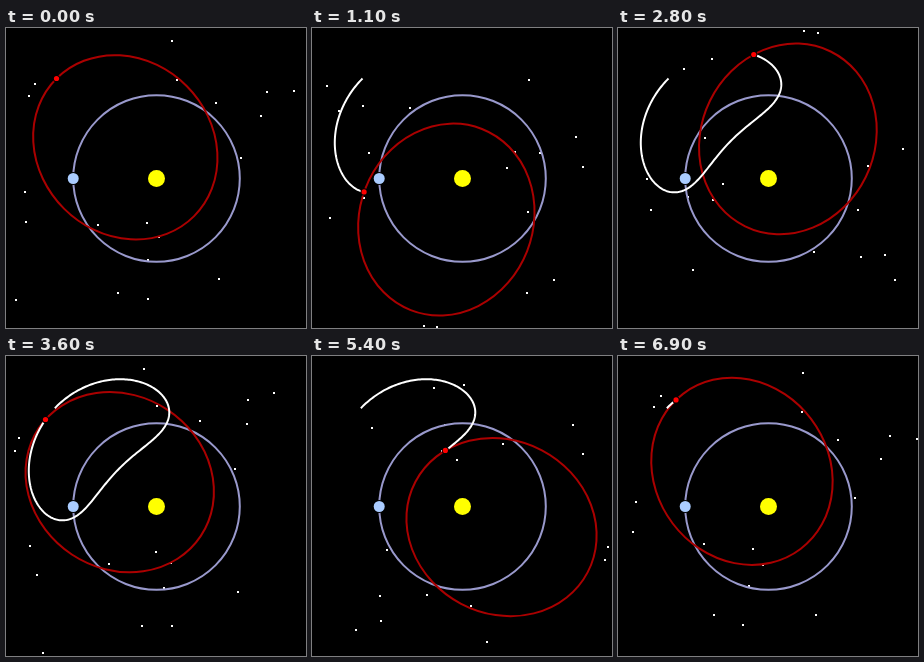
Recreate the animation shown at these times as an HTML page with a canvas. Size 300x300 px, loop 7000 ms.

```html
<!DOCTYPE html>
<html lang="en">
<head>
<meta charset="utf-8">
<title>Co-orbital asteroid in a rotating frame</title>
<style>
html, body { margin: 0; height: 100%; overflow: hidden; background: #000; }
canvas { display: block; }
</style>
</head>
<body>
<canvas id="stage" width="300" height="300"></canvas>
<script>
const ctx = document.getElementById('stage').getContext('2d');
const STEP_MS = 100, STEPS = 70, YEAR = 35;
const RAD = Math.PI / 180;
const FRAME_SPIN = 10.319 * RAD;   // turn of the view per step
const MEAN_MOTION = 10.3 * RAD;    // asteroid's mean anomaly per step
const RING = 83.3;
const A = 97.3, C = 44.1, B = Math.sqrt(A * A - C * C), ECC = C / A;

// Star positions relative to the sun
const STARS = [
  [16, -137], [-121, -94], [-127, -82], [21, -98], [60, -75], [111, -86],
  [138, -87], [105, -62], [85, -20], [-131, 14], [-130, 44], [-58, 47],
  [-9, 45], [3, 59], [-8, 82], [-38, 115], [-8, 121], [63, 101], [-140, 122]
];

const axisAngle = n => -135 * RAD - FRAME_SPIN * n;

function rotate(x, y, angle) {
  const c = Math.cos(angle), s = Math.sin(angle);
  return [x * c - y * s, x * s + y * c];
}

// Kepler orbit, with anomalies counted from aphelion
function asteroid(n) {
  const mean = MEAN_MOTION * n;
  let E = mean;
  for (let i = 0; i < 12; i++) {
    E -= (E + ECC * Math.sin(E) - mean) / (1 + ECC * Math.cos(E));
  }
  return rotate(C + A * Math.cos(E), B * Math.sin(E), axisAngle(n));
}

function stroke(color) {
  ctx.strokeStyle = color;
  ctx.lineWidth = 2;
  ctx.stroke();
}

function disc(x, y, r, color) {
  ctx.beginPath();
  ctx.arc(x, y, r + 1, 0, 2 * Math.PI);
  ctx.fillStyle = '#000';
  ctx.fill();
  ctx.beginPath();
  ctx.arc(x, y, r, 0, 2 * Math.PI);
  ctx.fillStyle = color;
  ctx.fill();
}

function trail(from, to) {
  if (to <= from) return;
  const count = Math.ceil((to - from) * 8);
  ctx.beginPath();
  for (let i = 0; i <= count; i++) {
    ctx.lineTo(...asteroid(from + (to - from) * i / count));
  }
  stroke('#fff');
}

function draw(n) {
  ctx.setTransform(1, 0, 0, 1, 0, 0);
  ctx.fillStyle = '#000';
  ctx.fillRect(0, 0, 300, 300);

  ctx.fillStyle = '#fff';
  for (const [sx, sy] of STARS) {
    const [x, y] = rotate(sx, sy, -FRAME_SPIN * n);
    ctx.fillRect(Math.round(x) + 149, Math.round(y) + 149, 2, 2);
  }

  ctx.translate(150.5, 150.5);
  ctx.beginPath();
  ctx.arc(0, 0, RING, 0, 2 * Math.PI);
  stroke('#9999cc');

  const angle = axisAngle(n);
  ctx.beginPath();
  ctx.ellipse(...rotate(C, 0, angle), A, B, angle, 0, 2 * Math.PI);
  stroke('#aa0000');

  // The path is drawn during the first year and erased during the second
  if (n <= YEAR) trail(0, n);
  else trail(n - YEAR + 0.2, YEAR);

  disc(0, 0, 8.5, '#ffff00');
  disc(-RING, 0, 5.5, '#aaccff');
  disc(...asteroid(n), 2.6, '#ff0000');
}

const start = performance.now();
function tick() {
  draw(Math.floor((performance.now() - start) / STEP_MS) % STEPS);
  requestAnimationFrame(tick);
}
tick();
</script>
</body>
</html>
```
